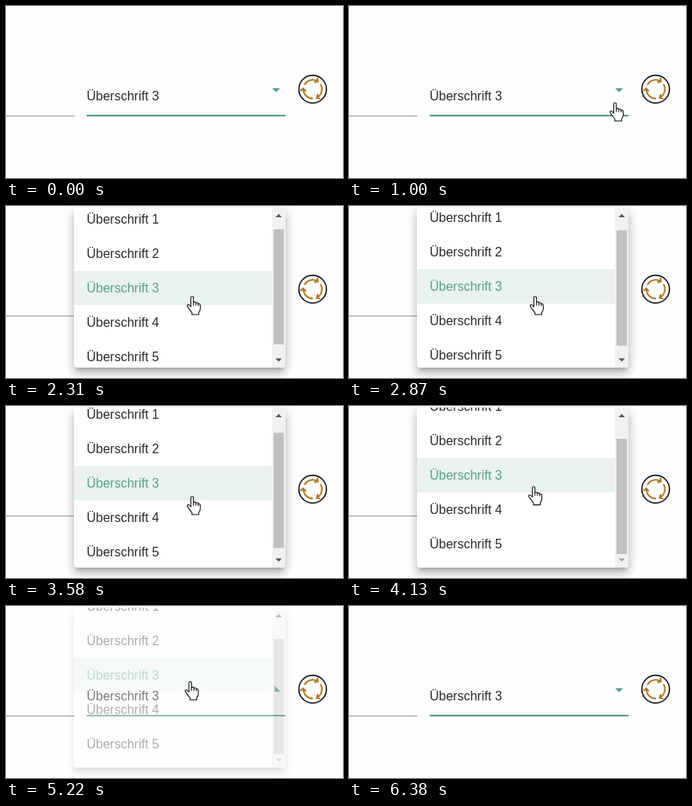
Animation of 422x215 px, one loop 6950 ms. Source, as an HTML page:

```html
<!DOCTYPE html>
<html lang="de">
<head>
<meta charset="utf-8">
<title>Auswahlfeld</title>
<style>
html, body { margin: 0; width: 100%; height: 100%; overflow: hidden; background: #fefefe; }
body { position: relative; font: 16px/43px "Liberation Sans", Arial, sans-serif; color: #2b2b2b; }
svg { position: absolute; left: 0; top: 0; width: 422px; height: 215px; }
.label { position: absolute; left: 101px; top: 91px; white-space: nowrap; }
.panel {
  position: absolute; left: 85px; top: 2px; width: 265px; height: 200px; overflow: hidden;
  background: #fff; border-radius: 4px; transform-origin: 50% 50%;
  box-shadow: 0 5px 5px -3px rgba(0,0,0,.2), 0 8px 10px 1px rgba(0,0,0,.14), 0 3px 14px 2px rgba(0,0,0,.12);
}
.list { position: absolute; left: 0; top: -7px; width: 248px; }
.list div { height: 43px; padding-left: 16px; white-space: nowrap; }
.list .on { background: #e9f2ef; color: #57a08a; }
.bar { position: absolute; right: 0; top: 0; width: 17px; height: 200px; background: #f1f1f1; }
.thumb { position: absolute; left: 2px; top: 27px; width: 13px; height: 144px; background: #c1c1c1; }
.bar svg { width: 17px; height: 200px; }
</style>
</head>
<body>
<svg viewBox="0 0 422 215">
  <path d="M0 137.5H86" stroke="#959a9a"/>
  <path d="M101 137H350" stroke="#4f9f8c" stroke-width="2"/>
  <path id="caret" d="M-5 -2.5H5L0 2.5Z" fill="#4f9f8c"/>
  <circle cx="384" cy="104" r="17.3" fill="#fff" stroke="#1d1d1d" stroke-width="1.7"/>
  <g id="ring" fill="none" stroke="#b67a22" stroke-width="2"></g>
</svg>
<div class="label">Überschrift 3</div>
<div class="panel" id="panel">
  <div class="list" id="list"></div>
  <div class="bar">
    <div class="thumb" id="thumb"></div>
    <svg viewBox="0 0 17 200">
      <path d="M4.5 12H12.5L8.5 8Z" fill="#505050"/>
      <path id="down" d="M4.5 188.5H12.5L8.5 192.5Z"/>
    </svg>
  </div>
</div>
<svg viewBox="0 0 422 215">
  <circle id="click" r="11.3" fill="#f5f05f" opacity=".93"/>
  <g id="cursor" fill="#fff" stroke="#111" stroke-width="1.1" stroke-linejoin="round">
    <path id="arrow" d="M0 .5V16.3L3.7 12.8L6.3 18.6L8.8 17.5L6.3 11.8H11.2Z"/>
    <path id="hand" d="M0 13.5V2.2Q0 .5 1.6 .5T3.2 2.2V8.2Q3.4 7.4 4.7 7.4Q6.2 7.4 6.3 9Q6.6 8.2 7.8 8.3Q9.2 8.5 9.2 10Q9.6 9.4 10.6 9.7Q11.8 10 11.8 11.6V16Q11.8 18.5 9.8 20.5V23.3H1.4V20.8Q-1 18 -4 13.6Q-5.2 11.6 -4 10.9Q-2.6 10.2 0 13.5ZM3.2 8V12M6.3 9V12M9.2 10V12.5"/>
  </g>
</svg>
<script>
const LOOP = 6950;
const $ = id => document.getElementById(id);
const show = (el, on) => { el.style.display = on ? "" : "none"; };
const within = (t, a, b) => t >= a && t < b;

$("list").innerHTML = [1, 2, 3, 4, 5]
  .map(n => `<div${n === 3 ? ' class="on"' : ""}>Überschrift ${n}</div>`).join("");
$("ring").innerHTML = [0, 120, 240].map(a =>
  `<path transform="translate(384 104) rotate(${a})" d="M.5 11.6A11.6 11.6 0 0 1 -11.6 -.5M-15.2 2.2L-11.8 -1L-8.4 2.6"/>`).join("");

// Number of steps already taken out of n, the first at a and the last at b
const taken = (t, a, b, n) =>
  t < a ? 0 : Math.min(n, 1 + Math.floor((t - a) * (n - 1) / (b - a) + .1));

// Cursor moves: first step, last step, steps, offset, span, target x, y
const moves = [
  [530, 1150, 9, -1, 8, 327, 107],
  [1380, 1610, 4, 0, 2, 341, 104],
  [1770, 2310, 8, -1, 7, 231.5, 112.5],
  [4050, 4210, 3, 0, 3, 229, 96],
  [4440, 4441, 1, 0, 1, 229, 94],
  [5690, 6230, 8, 0, 7, 389, 189]
];

function cursorAt(t) {
  let x = 356, y = 193;
  for (const [a, b, n, off, span, tx, ty] of moves) {
    const p = Math.max(0, Math.min(1, (taken(t, a, b, n) + off) / span));
    const e = p * p * (3 - 2 * p);
    x += (tx - x) * e;
    y += (ty - y) * e;
  }
  return [x, y];
}

function draw(t) {
  const opening = taken(t, 1770, 2310, 8);
  const closing = taken(t, 4990, 5460, 7);
  const inAlpha = [0, 0, .8][opening] ?? 1;
  const alpha = closing < 4 ? inAlpha : closing === 4 ? .38 : 0;
  const panel = $("panel");
  panel.style.opacity = alpha;
  panel.style.transform = `scaleY(${closing ? 1 : .8 + .2 * inAlpha})`;

  const scroll = [0, 1, 2][taken(t, 2790, 2870, 2)]
    + [0, 2, 4, 10, 14][taken(t, 3500, 3730, 4)];
  $("list").style.transform = `translateY(${-scroll}px)`;
  $("thumb").style.transform = `translateY(${scroll * .75}px)`;
  $("down").setAttribute("fill", scroll === 16 ? "#a3a3a3" : "#505050");

  const turned = opening === 1 || closing === 4;
  $("caret").setAttribute("transform", `translate(338.3 105.3) rotate(${turned ? 45 : 0})`);

  const [x, y] = cursorAt(t);
  const onBar = within(t, 1770, 5690) && x > 333;
  const pointer = y < 139 && !onBar;
  show($("cursor"), within(t, 530, 6225));
  show($("hand"), pointer);
  show($("arrow"), !pointer);
  $("cursor").setAttribute("transform", `translate(${x} ${y})`);
  show($("click"), within(t, 1530, 1605) || within(t, 4985, 5140));
  $("click").setAttribute("transform", `translate(${x} ${y})`);
}

const begin = performance.now();
function tick() {
  draw((performance.now() - begin) % LOOP);
  requestAnimationFrame(tick);
}
tick();
</script>
</body>
</html>
```
